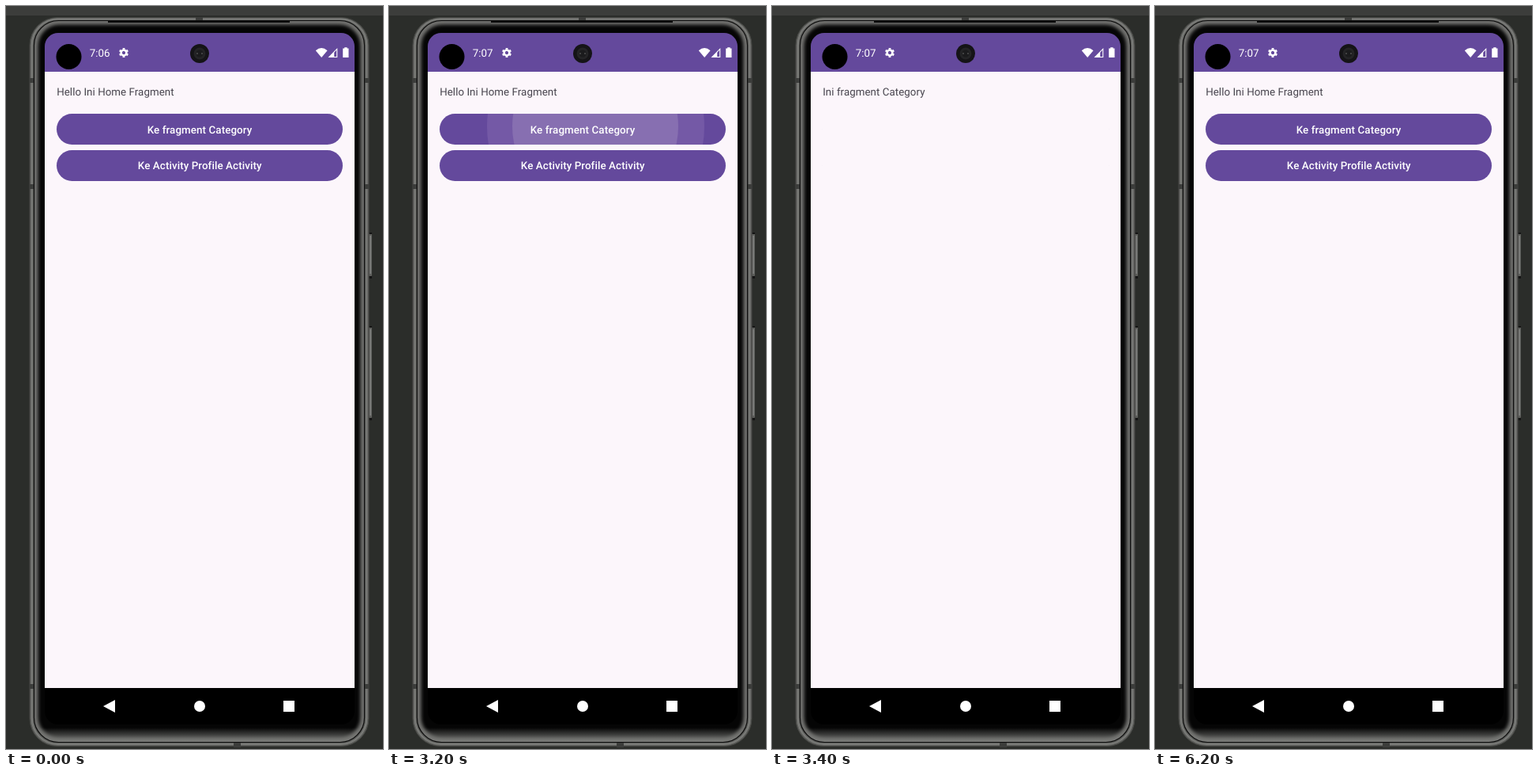
These frames come from a looping animation (477x938 px, 8 s). An HTML page:

```html
<!DOCTYPE html>
<html lang="id">
<head>
<meta charset="utf-8">
<title>Fragment navigation</title>
<style>
  html, body { margin: 0; width: 100%; height: 100%; overflow: hidden; background: #2b2d2a; }
  svg { display: block; width: 100%; height: 100%; }
  text { font-family: Roboto, sans-serif; font-size: 13.35px; text-rendering: geometricPrecision; }
  .label { fill: #fff; font-weight: 500; letter-spacing: .095px; text-anchor: middle; }
  .body { fill: #48454e; letter-spacing: .04px; }
</style>
</head>
<body>
<svg viewBox="0 0 477 938" preserveAspectRatio="none">
  <defs>
    <filter id="soft" x="-10%" y="-10%" width="120%" height="120%"><feGaussianBlur stdDeviation="2.2"/></filter>
    <clipPath id="glass"><rect x="35.5" y="18.5" width="418" height="911" rx="31"/></clipPath>
    <clipPath id="screen"><rect x="49" y="34" width="392" height="873" rx="17"/></clipPath>
    <clipPath id="pill"><rect x="64" y="136" width="362" height="39" rx="19.5"/></clipPath>
    <linearGradient id="chin" x1="0" y1="0" x2="0" y2="1">
      <stop offset="0" stop-color="#777875" stop-opacity="0"/>
      <stop offset="1" stop-color="#777875"/>
    </linearGradient>
  </defs>

  <rect width="477" height="938" fill="#2b2d2a"/>
  <rect width="477" height="12" fill="#3c3d3b"/>

  <!-- Phone body -->
  <g id="keys"></g>
  <rect x="30" y="14.5" width="429" height="920" rx="35" fill="#5e5f5c" stroke="#444542"/>
  <rect x="32.7" y="16.5" width="423.6" height="915.5" rx="33" fill="none" stroke="#7a7b78" stroke-width="2"/>
  <g id="bands" fill="#3c3d3b"></g>
  <rect x="35.5" y="18.5" width="418" height="911" rx="31" fill="#050505"/>
  <g clip-path="url(#glass)">
    <rect x="36.5" y="19.5" width="416" height="909" rx="31" fill="none" stroke="#747572" stroke-width="8" filter="url(#soft)"/>
    <rect x="42" y="911" width="405" height="18" fill="url(#chin)"/>
  </g>
  <rect x="35.5" y="18.5" width="418" height="911" rx="31" fill="none" stroke="#0c0c0c" stroke-width="1.2"/>
  <path d="M129 19.5H359" stroke="#0b0b0b" stroke-width="3"/>

  <!-- Screen -->
  <g clip-path="url(#screen)">
    <rect x="49" y="34" width="392" height="49" fill="#64499c"/>
    <rect x="49" y="83" width="392" height="778" fill="#fcf6fb"/>
    <rect x="49" y="861" width="392" height="46" fill="#000"/>
  </g>

  <!-- Status bar -->
  <circle cx="79.5" cy="64" r="16"/>
  <text id="clock" x="105.8" y="63.7" fill="#fff"></text>
  <g transform="translate(149 59) rotate(15)" fill="none" stroke="#fff">
    <circle r="3.4" stroke-width="2.6"/>
    <circle r="5.2" stroke-width="1.8" pathLength="12" stroke-dasharray="1 1"/>
  </g>
  <circle cx="245" cy="60" r="12" fill="#151417"/>
  <circle cx="245" cy="60" r="7.5" fill="#242426"/>
  <circle cx="245" cy="60" r="4.5" fill="#1b1b1d"/>
  <circle cx="242" cy="60" r=".9" fill="#555"/>
  <circle cx="248" cy="60" r=".9" fill="#555"/>
  <g fill="#fff">
    <path d="M391.8 56.2Q399.2 49.8 406.6 56.2L399.2 65Z"/>
    <path d="M407.5 65L419.3 53V65ZM415.2 63.9H418.2V55.6L415.2 58.7Z" fill-rule="evenodd"/>
    <path d="M428.2 52.3H431.6V53.5H433.5V65H426.2V53.5H428.2Z"/>
  </g>

  <!-- Pages -->
  <g id="home">
    <text class="body" x="64.2" y="113">Hello Ini Home Fragment</text>
    <rect x="64" y="136" width="362" height="39" rx="19.5" fill="#64499c"/>
    <g id="ripple" clip-path="url(#pill)"></g>
    <rect x="64" y="182" width="362" height="39" rx="19.5" fill="#64499c"/>
    <text class="label" x="245" y="160.5">Ke fragment Category</text>
    <text class="label" x="245.2" y="206.3">Ke Activity Profile Activity</text>
  </g>
  <text id="category" class="body" x="64.2" y="113">Ini fragment Category</text>

  <!-- Navigation bar -->
  <g fill="#fff">
    <path d="M123 884L138 876V892Z"/>
    <circle cx="245" cy="884" r="7"/>
    <rect x="351" y="877" width="14" height="14"/>
  </g>
</svg>
<script>
  const LOOP = 8000, MINUTE_AT = 700, TAP_AT = 3200, OPEN_AT = 3400, BACK_AT = 6200;
  const get = id => document.getElementById(id);
  const box = (x, y, w, h, extra = "") =>
    `<rect x="${x}" y="${y}" width="${w}" height="${h}" ${extra}/>`;

  get("keys").innerHTML = [[287, 54], [405, 115]].map(([y, h]) =>
    box(459, y, 4, h, 'rx="1" fill="#5c5d5a"') +
    box(460.5, y + 3, 1.2, h - 6, 'fill="#8b8c89"') +
    box(459.5, y - 1, 3.5, 2, 'fill="#151515"') +
    box(459.5, y + h, 3.5, 3, 'fill="#151515"')).join("");

  get("bands").innerHTML = [91, 225, 856].map(y =>
    box(29.5, y, 5.5, 6) + box(454, y, 5.5, 6)).join("") +
    box(240, 14, 9, 4) + box(288, 930, 9, 6);

  // Each wave step is a wide faint spread and a narrower bright core.
  const waves = [
    [[124, 399, "#7459a6"], [156, 366, "#876fb1"]],
    [[85, 417, "#7358a5"], [98, 404, "#8971b3"]]
  ];
  const disc = ([left, right, fill]) =>
    `<circle cx="${(left + right) / 2}" cy="152" r="${(right - left) / 2}" fill="${fill}"/>`;
  const show = (node, on) => node.setAttribute("display", on ? "inline" : "none");

  get("ripple").innerHTML = waves.map(w => `<g>${w.map(disc).join("")}</g>`).join("");
  const steps = [...get("ripple").children];

  function draw(t) {
    const onCategory = t >= OPEN_AT && t < BACK_AT;
    get("clock").textContent = t < MINUTE_AT ? "7:06" : "7:07";
    show(get("home"), !onCategory);
    show(get("category"), onCategory);
    steps.forEach((step, i) => show(step, Math.floor((t - TAP_AT) / 100) === i));
  }

  function tick() {
    draw(performance.now() % LOOP);
    requestAnimationFrame(tick);
  }
  tick();
</script>
</body>
</html>
```
